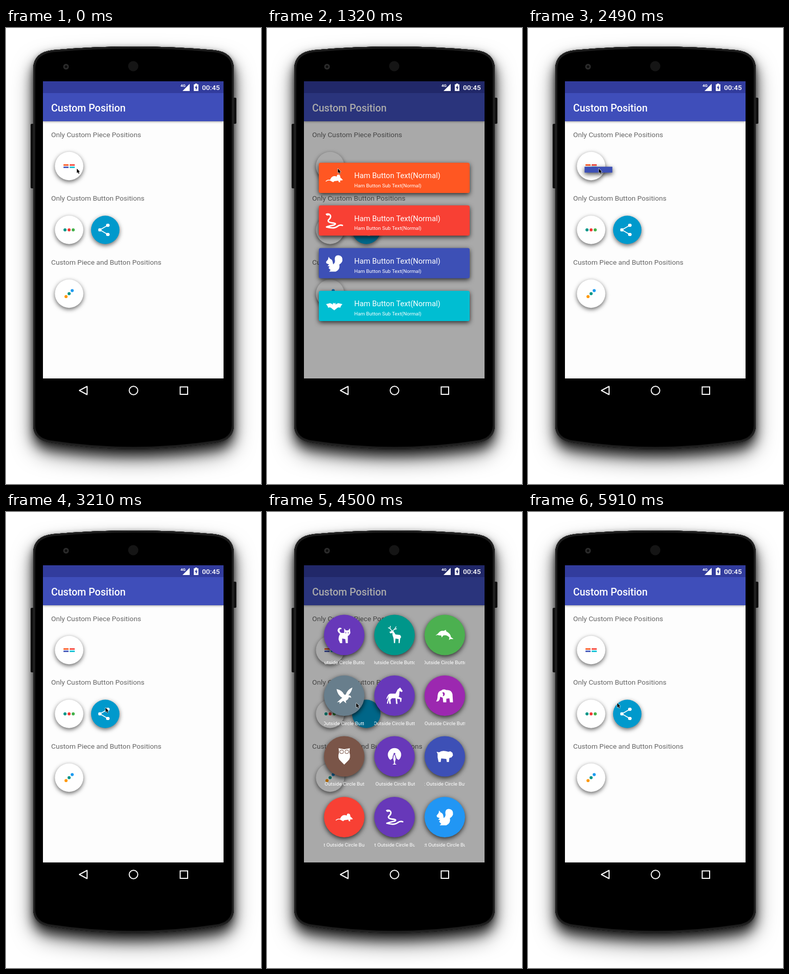
Write an HTML page with a canvas that moves like this. It is 497 by 890 pixels and loops after 5.94 s.

```html
<!DOCTYPE html>
<html lang="en">
<head>
<meta charset="utf-8">
<title>Custom Position</title>
<style>
html, body { margin: 0; width: 100%; height: 100%; overflow: hidden; background: #fff; }
canvas { display: block; width: 497px; height: 890px; }
</style>
</head>
<body>
<canvas id="stage"></canvas>
<script>
const W = 497, H = 890, LOOP = 5940;
const FONT = 'Roboto, "Noto Sans", sans-serif';
const dpr = window.devicePixelRatio || 1;
const canvas = document.getElementById('stage');
canvas.width = W * dpr;
canvas.height = H * dpr;
const ctx = canvas.getContext('2d');

// ---------- helpers ----------
const clamp = v => Math.max(0, Math.min(1, v));
const ramp = (t, a, b) => clamp((t - a) / (b - a));
const mix = (a, b, k) => a + (b - a) * k;
const smooth = k => k * k * (3 - 2 * k);
const rgb = c => `rgb(${c.map(Math.round).join(',')})`;
const mixColor = (a, b, k) => a.map((v, i) => mix(v, b[i], k));

function bezier(x1, y1, x2, y2) {
  const at = (a, b, u) => 3 * a * u * (1 - u) ** 2 + 3 * b * u * u * (1 - u) + u ** 3;
  return x => {
    if (x <= 0) return 0;
    if (x >= 1) return 1;
    let lo = 0, hi = 1;
    for (let i = 0; i < 24; i++) {
      const m = (lo + hi) / 2;
      if (at(x1, x2, m) < x) lo = m; else hi = m;
    }
    return at(y1, y2, lo);
  };
}
const outBack = bezier(.175, .885, .32, 1.275);
const inBack = bezier(.6, -.28, .735, .045);

function disc(c, x, y, r, fill) {
  c.fillStyle = fill;
  c.beginPath();
  c.arc(x, y, r, 0, Math.PI * 2);
  c.fill();
}
function box(c, x, y, w, h, r, fill) {
  c.fillStyle = fill;
  c.beginPath();
  c.roundRect(x, y, w, h, r);
  c.fill();
}
function label(c, str, x, y, size, fill, weight = 400) {
  c.font = `${weight} ${size}px ${FONT}`;
  c.fillStyle = fill;
  c.fillText(str, x, y);
}
function shadow(c, alpha, blur, dy) {
  c.shadowColor = `rgba(0,0,0,${alpha})`;
  c.shadowBlur = blur * dpr;
  c.shadowOffsetY = dy * dpr;
}
const noShadow = c => { c.shadowColor = 'transparent'; };

// ---------- icons: fill, stroke, stroke width ----------
const icon = (fill, line = '', width = 2) => ({ fill: new Path2D(fill), line: new Path2D(line), width });
const ICONS = {
  cat: icon('M-8-2Q-15-7-12-12Q-9-16-5-13L-6-11Q-9-12-9-9Q-9-5-5-4L0-4L0-13L3-9L8-9L11-13L12-4Q10 1 7 2L7 16L3 16L2 8L-4 7L-4 16L-8 16L-11 9Q-11 2-8-2ZM2-5h2v1.5h-2zM7-5h2v1.5h-2z'),
  deer: icon('M-10-6L-3-9L2-1L11 0L13 4L11 7L10 16L8 16L8 8L2 7L1 16L-1 16L-2 6L-4 0L-4-4L-8-3Z', 'M-5-8L-9-13L-8-17M-9-13L-12-14M-4-8L0-11L3-16M0-11L4-12', 1.4),
  dolphin: icon('M-18 1L-13-3Q-9-9-2-8L2-10L3-7Q11-3 12 4L17 8L11 8L8 10L9 5Q4-1-3 1L-6 5L-7 1Q-12 1-14 0Z'),
  eagle: icon('M16-16Q6-12 3-2L0-2Q-4-11-15-13Q-13-1-4 4L-14 13L-9 12L-9 16L-2 10L4 15L3 10Q8 8 9 3L14 4L12 0L8-1Q14-6 16-16Z'),
  horse: icon('M11-16L16-9L14-7L10-9L9 0L8 2L14 5L13 12L11 12L11 7L5 6L6 16L3 16L2 5L-5 5L-8 8L-7 16L-10 16L-11 8L-13 16L-15 15L-12 4L-12-1Q-12 5-16 7Q-13-5-7-4L2-4L6-12Z'),
  elephant: icon('M-17 11Q-14 8-14 0Q-13-9-7-10Q-3-14 3-11Q13-12 15-3L16 13L10 13L9 5L3 6L3 13L-3 13L-4 4L-9 2Q-10 13-17 11ZM-5-6Q-1-8 0-4Q0 1-4 1Q-2-3-5-6Z'),
  owl: icon('M-11-16L-6-15L0-14L6-15L11-16L10-8Q14 3 7 9L0 16L-7 9Q-14 3-10-8ZM-9-9a4 4 0 1 0 8 0a4 4 0 1 0-8 0M1-9a4 4 0 1 0 8 0a4 4 0 1 0-8 0M-8-9a3 3 0 1 0 6 0a3 3 0 1 0-6 0M2-9a3 3 0 1 0 6 0a3 3 0 1 0-6 0'),
  peacock: icon('M-8 7A13 13 0 1 1 8 7L4 4Q3 0 1-4L2-6L-1-7L-2-4Q-4 0-4 4ZM-.5-4Q4 4 1 10L1 14L4 16L-4 16L-1 14L-1 10Q-4 4-.5-4Z'),
  pig: icon('M16-2L15-7L11-10L7-9Q-5-13-11-8L-16-9L-14-5L-14 2L-12 11L-8 11L-7 4L3 5L4 11L8 11L9 3L13 2Z'),
  mouse: icon('M17 4Q14 0 12-1Q12-7 8-7Q5-7 5-3Q-3-6-7 1Q-9 4-6 6L-2 8L0 6L8 5L9 8L12 8L11 5Z', 'M-6 5Q-11 2-16 6', 1.3),
  snake: icon('M-17-13Q-14-16-9-14L-8-11L-14-10Z', 'M-14-12Q-8-14-7-9Q-7-5-11-2Q-14 3-4 4Q6 5 0 8Q-10 10-15 12Q0 16 6 11Q11 7 16 9', 2.8),
  squirrel: icon('M-16-3L-12-8L-11-13L-8-9Q-4-8-3-3L-2 2Q3-2 1-8Q1-16 8-16Q17-15 16-5Q14 0 10 2Q12 12 3 16L-10 16L-7 13L-11 9L-9 6L-13 5L-10 2L-15 0Z'),
  bat: icon('M-16-4L-8-6Q-4-5-3-3L-2-7L0-5L2-7L3-3Q4-5 8-6L16-4Q12 0 12 3Q7 1 4 5L0 8L-4 5Q-7 1-12 3Q-12 0-16-4Z')
};
function drawIcon(name) {
  const i = ICONS[name];
  ctx.fillStyle = ctx.strokeStyle = '#fff';
  ctx.fill(i.fill, 'evenodd');
  ctx.lineWidth = i.width;
  ctx.lineCap = ctx.lineJoin = 'round';
  ctx.stroke(i.line);
}

// ---------- menus ----------
const WHITE = [255, 255, 255];
const ORANGE = [255, 87, 34], RED = [248, 64, 52], INDIGO = [61, 80, 182], CYAN = [0, 190, 210];
const VIOLET = [103, 56, 185];
const SHOW = 390;

const hams = [
  { name: 'mouse', color: ORANGE, px: 117, py: 267.5, show: 525, hide: 2028 },
  { name: 'snake', color: RED, px: 129, py: 267.5, show: 620, hide: 1848 },
  { name: 'squirrel', color: INDIGO, px: 117, py: 272, show: 350, hide: 2118 },
  { name: 'bat', color: CYAN, px: 129, py: 272, show: 435, hide: 1938 }
].map((b, i) => ({ ...b, x: 248, y: 292.5 + i * 83.3, hideTime: 390 }));

const SHARE = [[198.5, 385], [183, 394], [198.5, 403]];
const HIDE_AT = [5065, 5099, 5148, 5175, 5213, 5365];
const circles = [
  ['cat', VIOLET], ['deer', [0, 150, 138]], ['dolphin', [76, 176, 80]],
  ['eagle', [104, 126, 140]], ['horse', VIOLET], ['elephant', [156, 40, 176]],
  ['owl', [122, 85, 72]], ['peacock', VIOLET], ['pig', INDIGO],
  ['mouse', RED], ['snake', VIOLET], ['squirrel', [33, 150, 244]]
].map(([name, color], i) => {
  const back = 11 - i, [px, py] = SHARE[i >> 2];
  return {
    name, color, i, px, py,
    x: 150.5 + (i % 3) * 98, y: 240 + Math.floor(i / 3) * 118.5,
    show: 3330 + i * 36,
    hide: back < 6 ? HIDE_AT[back] : 5401 + (back - 6) * 30,
    hideTime: 330
  };
});

// Extent (0 piece, 1 button), view opacity and whiteness; null while folded.
function pose(b, t) {
  if (t <= b.show || t >= b.hide + b.hideTime) return null;
  let e, alpha, white;
  if (t < b.hide) {
    const p = (t - b.show) / SHOW;
    e = outBack(p);
    alpha = clamp(p * 1.7);
    white = clamp(1 - p / .3);
  } else {
    const p = (t - b.hide) / b.hideTime;
    e = 1 - inBack(p);
    alpha = clamp(1 - 1.3 * p * p);
    white = clamp((p - .62) / .28);
  }
  return { e, alpha, white, x: mix(b.px, b.x, e), y: mix(b.py, b.y, e * e), spin: (e - 1) * Math.PI * 4 };
}

function drawHam(b, t) {
  const s = pose(b, t);
  if (!s) return;
  const w = Math.max(1, mix(10, 294, s.e)), h = Math.max(1, mix(3, 59, s.e)), k = w / 294;
  let color = b.color;
  const pressed = b === hams[0];
  if (pressed) color = mixColor(color, [132, 144, 132], ramp(t, 1780, 1870) * (1 - ramp(t, 1990, 2150)));
  ctx.save();
  ctx.translate(s.x, s.y);
  shadow(ctx, .75, 10, 3);
  box(ctx, -w / 2, -h / 2, w, h, 3.5 * k, rgb(color));
  noShadow(ctx);
  if (pressed && t > 1830 && t < 2150) {
    const p = (t - 1830) / 400;
    ctx.save();
    ctx.clip();
    ctx.globalAlpha = .7 * (1 - ramp(t, 1980, 2150));
    disc(ctx, mix(139, 248, p) - s.x, mix(273, 292, p) - s.y, 6 + 130 * p, 'rgb(50,160,160)');
    ctx.restore();
  }
  ctx.scale(k, k);
  ctx.globalAlpha = s.alpha;
  label(ctx, 'Ham Button Text(Normal)', -78, .7, 14.67, '#fff');
  label(ctx, 'Ham Button Sub Text(Normal)', -78, 18.5, 9.78, '#fff');
  ctx.translate(-117, .5);
  ctx.rotate(s.spin);
  drawIcon(b.name);
  ctx.restore();
}

function drawCircle(b, t) {
  const s = pose(b, t);
  if (!s) return;
  const r = Math.max(.5, mix(3, 39.5, s.e)), k = r / 39.5;
  let color = b.color;
  if (b.name === 'eagle') color = mixColor(color, [136, 112, 112], ramp(t, 4980, 5300));
  ctx.save();
  ctx.translate(s.x, s.y);
  shadow(ctx, .75, 10, 3);
  disc(ctx, 0, 0, r, rgb(mixColor(color, WHITE, s.white)));
  noShadow(ctx);
  ctx.rotate(s.spin);
  ctx.scale(k, k);
  ctx.globalAlpha = s.alpha;
  drawIcon(b.name);
  ctx.beginPath();
  ctx.rect(-39.5, 44, 79, 20);
  ctx.clip();
  const scroll = Math.max(0, 27 - b.i * 1.2 + (t - 4500) / 30);
  label(ctx, 'Text Outside Circle Button(Normal)', -39.5 - scroll, 57, 9.78, '#fff');
  ctx.restore();
}

// ---------- phone ----------
function bodyPath(c) {
  c.beginPath();
  c.moveTo(53, 80);
  c.quadraticCurveTo(53, 47, 92, 43);
  c.quadraticCurveTo(248, 29, 405, 43);
  c.quadraticCurveTo(444, 47, 444, 80);
  c.lineTo(444, 775);
  c.quadraticCurveTo(444, 804, 410, 809);
  c.quadraticCurveTo(248, 834, 87, 809);
  c.quadraticCurveTo(53, 804, 53, 775);
  c.closePath();
}
function makePhone() {
  const cv = document.createElement('canvas');
  cv.width = W * dpr;
  cv.height = H * dpr;
  const c = cv.getContext('2d');
  c.scale(dpr, dpr);
  c.fillStyle = '#fff';
  c.fillRect(0, 0, W, H);
  c.fillStyle = '#000';
  bodyPath(c);
  shadow(c, .5, 40, 22);
  c.fill();
  shadow(c, .7, 22, 14);
  c.fill();
  shadow(c, .4, 8, 2);
  c.fill();
  noShadow(c);
  box(c, 48, 187, 8, 126, 2, '#101010');
  box(c, 441, 136, 8, 51, 2, '#101010');
  bodyPath(c);
  c.fillStyle = '#000';
  c.fill();
  c.save();
  c.clip();
  c.strokeStyle = '#1c1c1c';
  c.lineWidth = 8;
  c.stroke();
  c.strokeStyle = '#2a2a2a';
  c.lineWidth = 2;
  c.stroke();
  c.restore();
  disc(c, 117, 75.5, 5.5, '#2b2b2b');
  disc(c, 117, 75.5, 2.5, '#0c0c0c');
  disc(c, 248, 74.5, 10, '#151515');
  c.strokeStyle = '#fff';
  c.lineWidth = 2;
  c.lineJoin = 'round';
  c.stroke(new Path2D('M143 707.5L158 699.5V715.5Z'));
  c.beginPath();
  c.arc(248.5, 707.5, 8.3, 0, Math.PI * 2);
  c.stroke();
  c.lineJoin = 'miter';
  c.strokeRect(339.5, 700.5, 14.5, 14.5);
  return cv;
}
const phone = makePhone();

function whiteButton(x, y, fill = '#fff') {
  shadow(ctx, .6, 9, 3);
  disc(ctx, x, y, 27.7, fill);
  noShadow(ctx);
}

function drawApp(t) {
  ctx.fillStyle = '#fdfdfd';
  ctx.fillRect(72, 104, 352, 580);
  shadow(ctx, .4, 4, 1);
  ctx.fillStyle = 'rgb(63,78,186)';
  ctx.fillRect(72, 127, 352, 55);
  noShadow(ctx);
  ctx.fillStyle = 'rgb(50,60,157)';
  ctx.fillRect(72, 104, 352, 23);
  label(ctx, 'Custom Position', 88, 162.5, 19.56, '#fff', 500);
  const grey = '#666';
  label(ctx, 'Only Custom Piece Positions', 88, 213, 13.69, grey);
  label(ctx, 'Only Custom Button Positions', 88, 337, 13.69, grey);
  label(ctx, 'Custom Piece and Button Positions', 88, 461.5, 13.69, grey);

  whiteButton(123, 269.5);
  for (const b of hams) if (!pose(b, t)) box(ctx, b.px - 5, b.py - 1.5, 10, 2.8, .5, rgb(b.color));

  whiteButton(123, 394);
  ['#009688', '#f43a36', '#43b04a'].forEach((f, i) => disc(ctx, 115 + i * 8, 394, 3, f));

  whiteButton(193.5, 394, '#0099cc');
  ctx.globalAlpha = 1 - ramp(t, 3330, 3650) + ramp(t, 5620, 5870);
  ctx.strokeStyle = '#fff';
  ctx.lineWidth = 1.6;
  ctx.lineJoin = 'round';
  ctx.beginPath();
  SHARE.forEach(p => ctx.lineTo(...p));
  ctx.stroke();
  ctx.globalAlpha = 1;
  for (const b of circles) if (!pose(b, t)) disc(ctx, b.px, b.py, 3.1, '#fff');

  whiteButton(123, 518.5);
  disc(ctx, 129, 512.5, 3, '#1e9cf0');
  disc(ctx, 123, 518.5, 3, '#009688');
  disc(ctx, 117, 524.3, 3, '#ff9800');
}

function drawStatus() {
  label(ctx, '4G', 340, 115.3, 8, '#fff', 700);
  ctx.fillStyle = '#fff';
  ctx.fill(new Path2D('M358 109V123H344Z'));
  ctx.fill(new Path2D('M366 110H368.5V108.5H372.5V110H375V123H366ZM371.5 111.5L368 117H370V121.5L373.3 115.5H371.5Z'), 'evenodd');
  label(ctx, '00:45', 382, 121, 13.69, '#fff', 500);
}

function drawCursor(t) {
  const a = smooth(ramp(t, 2560, 3120)), b = smooth(ramp(t, 3520, 4150));
  ctx.save();
  ctx.translate(138 + 56 * a - 20 * b, 274.5 + 107.5 * a - 9 * b);
  const arrow = new Path2D('M0 0V8.5L2 6.8L3.5 10L5 9.3L3.6 6.2L6 6Z');
  ctx.strokeStyle = 'rgba(255,255,255,.8)';
  ctx.lineWidth = 1.2;
  ctx.stroke(arrow);
  ctx.fillStyle = '#000';
  ctx.fill(arrow);
  ctx.restore();
}

function dimAt(t) {
  const first = Math.sin(ramp(t, 350, 950) * Math.PI / 2) * (1 - smooth(ramp(t, 1860, 2508)));
  const second = Math.sin(ramp(t, 3330, 4116) * Math.PI / 2) * (1 - ramp(t, 5065, 5881) ** 1.7);
  return (first + second) / 3;
}

function draw(t) {
  ctx.setTransform(1, 0, 0, 1, 0, 0);
  ctx.drawImage(phone, 0, 0);
  ctx.setTransform(dpr, 0, 0, dpr, 0, 0);
  ctx.save();
  ctx.beginPath();
  ctx.rect(72, 104, 352, 580);
  ctx.clip();
  drawApp(t);
  ctx.fillStyle = `rgba(0,0,0,${dimAt(t)})`;
  ctx.fillRect(72, 104, 352, 580);
  drawStatus();
  for (const b of hams) drawHam(b, t);
  for (const b of [...circles].reverse()) drawCircle(b, t);
  drawCursor(t);
  ctx.restore();
}

const start = performance.now();
function tick() {
  draw((performance.now() - start) % LOOP);
  requestAnimationFrame(tick);
}
tick();
</script>
</body>
</html>
```
